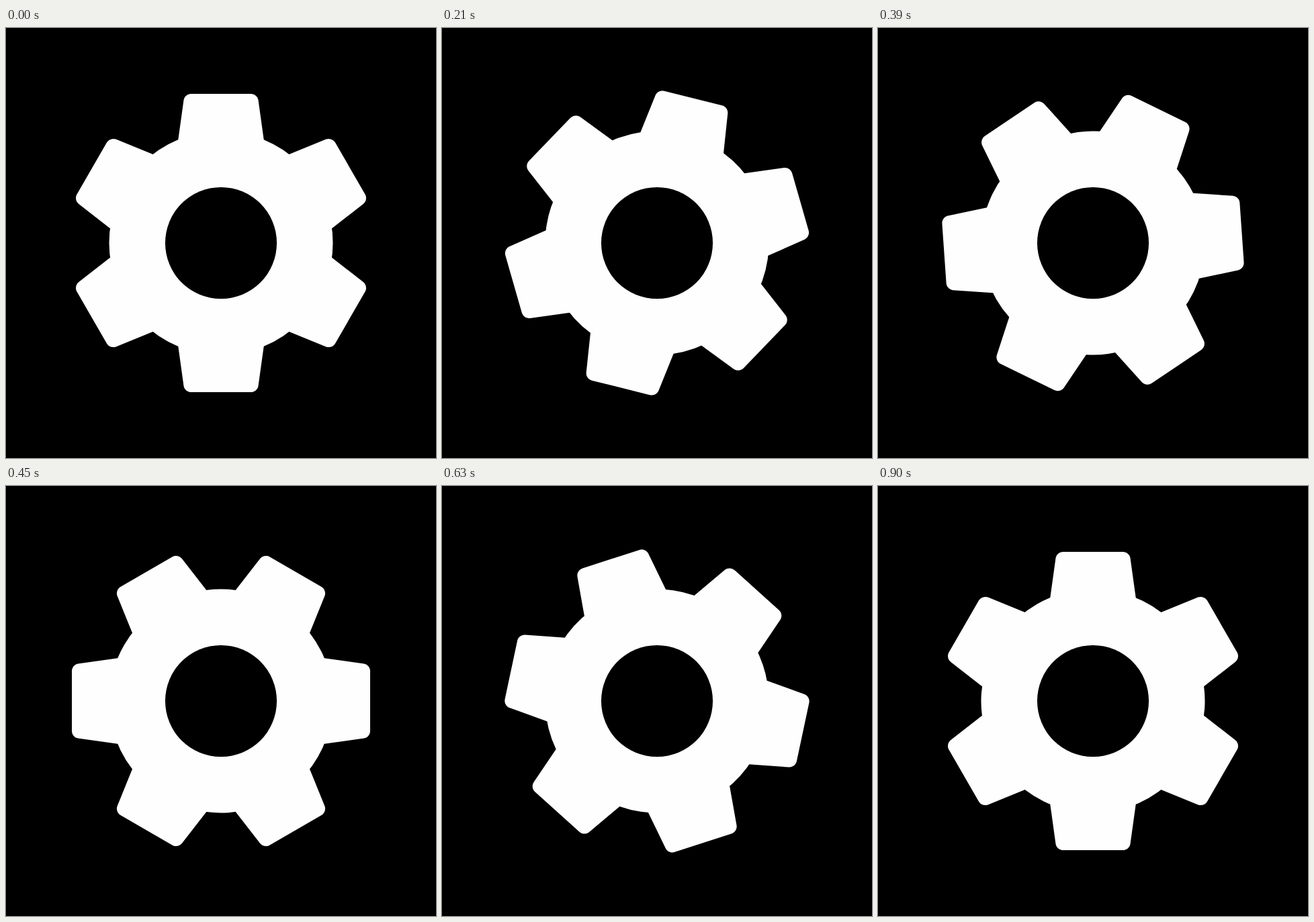
An HTML page that plays this animation: 640 px wide and 640 px high, repeating every 0.93 s.

```html
<!DOCTYPE html>
<html lang="en">
<head>
<meta charset="utf-8">
<title>Turning gear</title>
<style>
  html, body { margin: 0; width: 100%; height: 100%; overflow: hidden; background: #000; }
  svg { display: block; width: 100%; height: 100%; }
</style>
</head>
<body>
<svg viewBox="0 0 640 640">
  <defs>
    <path id="tooth" d="M0 0 L-2.87 -6.93 L-2.5 -9.58 C-2.46 -9.82 -2.25 -10 -2 -10 H2 C2.25 -10 2.46 -9.82 2.5 -9.58 L2.87 -6.93 Z"/>
  </defs>
  <g transform="translate(320 320) scale(22.2)">
    <g id="gear" fill="#fefefe">
      <circle r="7.5"/>
    </g>
    <circle r="3.74" fill="#000"/>
  </g>
</svg>
<script>
  const LOOP = 930, STEP = 30, DEGREES_PER_STEP = 2, TEETH = 6;
  const gear = document.getElementById('gear');

  for (let i = 0; i < TEETH; i++) {
    const tooth = document.createElementNS('http://www.w3.org/2000/svg', 'use');
    tooth.setAttribute('href', '#tooth');
    tooth.setAttribute('transform', `rotate(${i * 360 / TEETH})`);
    gear.append(tooth);
  }

  const start = performance.now();

  function draw() {
    const time = (performance.now() - start) % LOOP;
    const angle = Math.floor(time / STEP) * DEGREES_PER_STEP;
    gear.setAttribute('transform', `rotate(${angle})`);
    requestAnimationFrame(draw);
  }
  draw();
</script>
</body>
</html>
```
